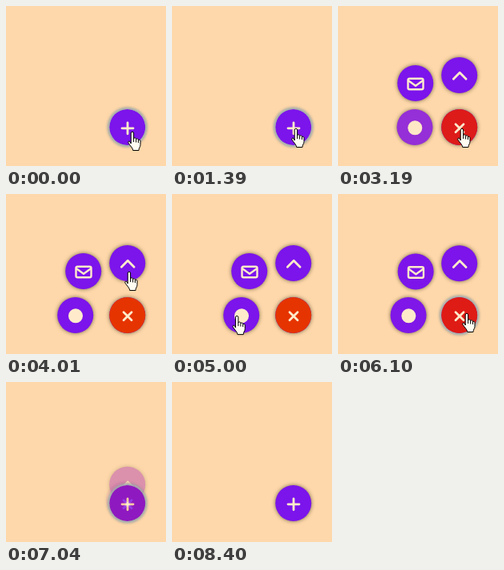
Animation of 200 by 200 pixels, one loop 8450 ms. Source, as an HTML page:

```html
<!DOCTYPE html>
<html lang="en">
<head>
<meta charset="utf-8">
<title>Floating action button</title>
<style>
  html, body { margin: 0; width: 100%; height: 100%; overflow: hidden; background: #fed8aa; }
  .btn, #cursor { position: absolute; left: 0; top: 0; }
  .btn {
    width: 45px; height: 45px; margin: -22.5px 0 0 -22.5px; border-radius: 50%;
    background: #7c14ec; box-shadow: 0 0 5px rgba(40, 40, 20, .65);
  }
  .close { background: #e63400; box-shadow: none; }
  .close.hover { background: #e01c14; }
  .ring { background: none; box-shadow: 0 0 3px 2px #a3b2ba; }
  svg { display: block; overflow: visible; }
  .btn svg { fill: none; stroke: #ffebcb; stroke-width: 2.8; stroke-linecap: round; stroke-linejoin: round; }
  #cursor { fill: #fffdf2; stroke: #000; stroke-linejoin: round; }
</style>
</head>
<body>
<svg id="cursor" width="18" height="25" style="z-index: 1">
  <path id="hand" d="M-1 15V2a1.7 1.7 0 0 1 3.4 0v7c0-1.6 3-1.6 3 .3v.6c0-1.5 2.8-1.4 2.8.4v.8c.3-1.3 2.6-1 2.6.6v4.8c0 3-2 3.5-2 7H1.5c0-3-3.5-5.5-5.7-9.3-1-1.8.8-2.8 2-1.6zM2.4 9v4M5.4 10v3.5M8.2 11v3"/>
  <path id="arrow" d="M0 0v16l4-3.6 2.6 5.8 2.4-1.1-2.5-5.6h5.3z"/>
</svg>
<script>
const LOOP = 8450, OPEN = 1900, CLOSE = 6020, FADE = 1450;
const HOME = [151.2, 151];
const $ = id => document.getElementById(id);

const ramp = (t, start, end) => Math.min(1, Math.max(0, (t - start) / (end - start)));
const mix = (a, b, k) => a + (b - a) * k;
const mixPoint = (a, b, k) => a.map((v, i) => mix(v, b[i], k));
const near = ([x, y], dx, dy) => [x + dx, y + dy];

// cubic-bezier(.42, 0, .58, 1)
function ease(x) {
  let lo = 0, hi = 1, s = .5;
  for (let i = 0; i < 18; i++) {
    s = (lo + hi) / 2;
    const bx = 3 * s * (1 - s) * mix(.42, .58, s) + s ** 3;
    if (bx < x) lo = s; else hi = s;
  }
  return s * s * (3 - 2 * s);
}

function addButton(icon, kind = '') {
  const el = document.createElement('div');
  el.className = 'btn ' + kind;
  el.innerHTML = `<svg width="45" height="45" viewBox="-22.8 -22.8 45 45">${icon}</svg>`;
  document.body.append(el);
  return el;
}

const CHAT = near(HOME, -65, 0), MAIL = near(HOME, -55, -55), UP = near(HOME, 0, -65);
const MAIL_ICON = '<g stroke-width="2.4"><rect x="-9.5" y="-6" width="19" height="13.5" rx="2"/><path d="M-9-3.5L0 3 9-3.5"/></g>';

// the last to appear is the first to go
const items = [
  [CHAT, '<circle cy=".5" r="9" fill="#ffebcb" stroke="none"/>'],
  [MAIL, MAIL_ICON],
  [UP, '<path d="M-7.7 4.5L.2-3.5 8.1 4.5"/>']
].map(([at, icon], i) => ({ at, el: addButton(icon), open: 1750 - 475 * i, close: 800 + 475 * i }));

const main = addButton('<path d="M-7 1H7M0-6V8"/>');
const ring = addButton('', 'ring');
const close = addButton('<path d="M-5-4L5 6M5-4L-5 6"/>', 'close');

// each pointer move: start, end, where its tip stops
const START = near(HOME, 6, 6), LEAVE = 6760;
const moves = [
  [460, 700, near(HOME, -13, 14)],
  [910, 1150, near(HOME, -101, -9)],
  [1150, 1390, near(HOME, 3, 2)],
  [3420, 3940, near(UP, 2, 11)],
  [4100, 4450, MAIL],
  [4600, 5040, near(CHAT, -6, 2)],
  [5180, 5730, near(HOME, 9, -2)],
  [6450, LEAVE, near(HOME, 29, 2)]
];
const pointer = t =>
  moves.reduce((p, [start, end, to]) => mixPoint(p, to, ease(ramp(t, start, end))), START);

const shown = (t, open, close) => t < CLOSE
  ? ease(ramp(t, OPEN, OPEN + open))
  : 1 - ease(ramp(t, CLOSE, CLOSE + close));

function place(el, [x, y], opacity = 1) {
  el.style.transform = `translate(${x}px, ${y}px)`;
  el.style.opacity = opacity < .001 ? 0 : opacity;
}

function draw(t) {
  const tip = pointer(t), visible = t < LEAVE;
  const over = ([x, y]) => visible && Math.hypot(tip[0] - x, tip[1] - y) < 23;

  const spots = items.map(({ el, at, open, close }) => {
    const p = shown(t, open, close), pos = mixPoint(HOME, at, p);
    place(el, pos, p);
    el.style.background = `rgb(${mix(179, 124, p)}, 20, ${mix(143, 236, p)})`;
    return pos;
  });

  place(main, HOME);
  place(ring, HOME, t < CLOSE - 200
    ? 1 - ramp(t, OPEN, OPEN + 700)
    : ramp(t, CLOSE - 100, CLOSE) * (1 - ramp(t, 8290, 8400)));
  place(close, HOME, shown(t, FADE, FADE));
  close.classList.toggle('hover', over(HOME));

  const hand = [HOME, ...spots].some(over);
  place($('cursor'), tip, visible ? 1 : 0);
  $('hand').style.display = hand ? '' : 'none';
  $('arrow').style.display = hand ? 'none' : '';
}

const began = performance.now();
function tick() {
  draw((performance.now() - began) % LOOP);
  requestAnimationFrame(tick);
}
tick();
</script>
</body>
</html>
```
